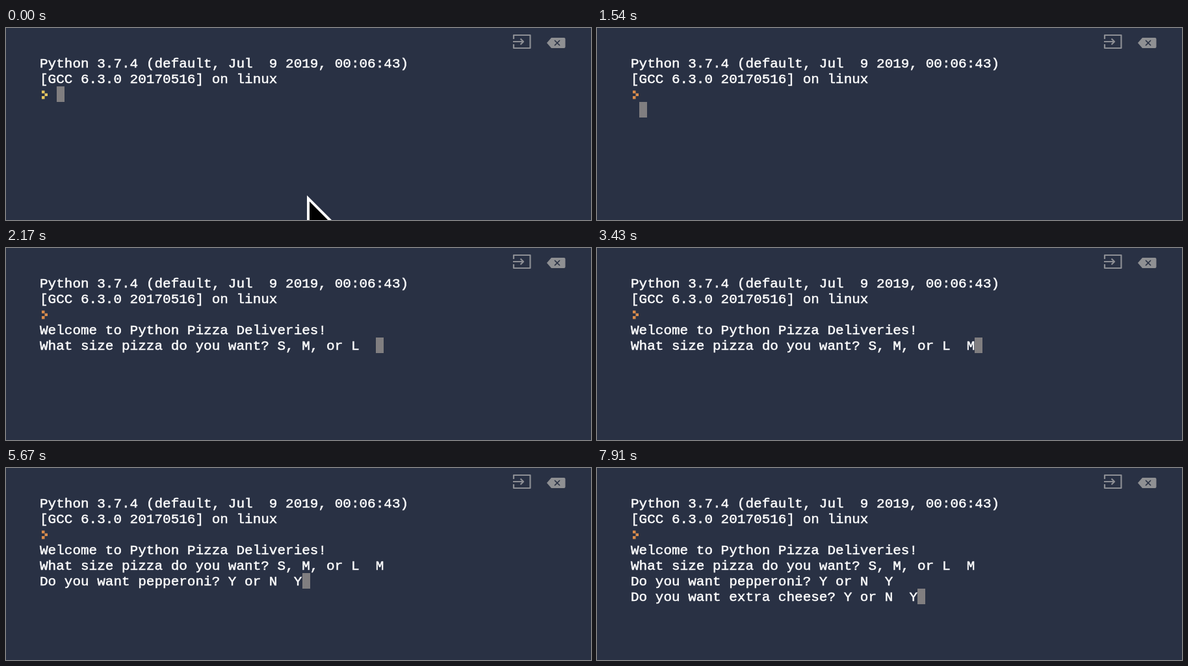
An HTML page for the animation above (8 s loop, 900 by 296 pixels).

```html
<!DOCTYPE html>
<html lang="en">
<head>
<meta charset="utf-8">
<title>Pizza terminal</title>
<style>
  html, body { margin: 0; width: 100%; height: 100%; overflow: hidden; background: #293144; }
  svg { display: block; width: 900px; height: 296px; }
  text {
    font: 21px "Liberation Mono", "Courier New", monospace;
    white-space: pre; fill: #fff; stroke: #fff; stroke-width: .5px;
  }
</style>
</head>
<body>
<svg viewBox="0 0 900 296">
  <rect width="900" height="296" fill="#293144"/>
  <g fill="none" stroke="#8c8e94" stroke-width="2.2" stroke-linejoin="round">
    <path d="M781 17V11H806.5V31H781V25"/>
    <path d="M780 21H796M791.5 16.5L796 21L791.5 25.5"/>
  </g>
  <path d="M832 23L839 15H858.5Q860.5 15 860.5 17V29Q860.5 31 858.5 31H839Z" fill="#8f9093"/>
  <path d="M844 19L852 27M852 19L844 27" stroke="#293144" stroke-width="1.7"/>
  <path id="prompt" d="M55 96.5h4.5v4.3h-4.5zM59.5 100.8h4.5v4.3h-4.5zM55 105.1h4.5v4.3h-4.5z"/>
  <g id="lines"></g>
  <rect id="caret" width="12" height="24" fill="#807e80"/>
  <g id="mouse">
    <path d="M0 0V81L18 64L29 90L42 85L31 60L57 57Z" fill="#fff"/>
    <path d="M4 9.5V72L19.5 57L31 84.5L36.5 82L25.5 55.5L47 53Z" fill="#000"/>
  </g>
</svg>
<script>
const LOOP = 8000, TICK = 70;
const LEFT = 52, CELL = 12.6, ROW = 24, TOP = 42;
const get = id => document.getElementById(id);
const clamp = v => Math.min(1, Math.max(0, v));

// Each row holds [time, text] entries; the latest one that has begun is shown.
const rows = [
  [[0, "Python 3.7.4 (default, Jul  9 2019, 00:06:43)"]],
  [[0, "[GCC 6.3.0 20170516] on linux"]],
  [],
  [[1610, "Welcome to Python Pizza Deliveries!"]],
  [[1610, "What size pizza do you want? S, M, or L  "],
   [3430, "What size pizza do you want? S, M, or L  M"]],
  [[4200, "Do you want pepperoni? Y or N  "],
   [5670, "Do you want pepperoni? Y or N  Y"]],
  [[6160, "Do you want extra cheese? Y or N  "],
   [7700, "Do you want extra cheese? Y or N  Y"]]
];

// [time, row, column]
const caretStops = [
  [0, 2, 2], [1470, 3, 1], [1610, 4, 41], [3430, 4, 42], [3990, 5, 1],
  [4200, 5, 31], [5670, 5, 32], [6020, 6, 1], [6160, 6, 34], [7700, 6, 35]
];

const latest = (steps, t) => steps.filter(step => step[0] <= t).pop();

const labels = rows.map((_, i) => {
  const label = document.createElementNS("http://www.w3.org/2000/svg", "text");
  label.setAttribute("x", LEFT);
  label.setAttribute("y", TOP + i * ROW + 19);
  return get("lines").appendChild(label);
});

function drawMouse(t) {
  const ease = 1 - (1 - clamp(t / 210)) ** 2;
  const x = 463 + 328 * ease, y = 258 - 243 * ease;
  get("mouse").setAttribute("transform", `translate(${x} ${y})`);
  get("mouse").setAttribute("opacity", 1 - clamp((t - 980) / 350));
}

function draw(time) {
  const t = Math.floor(time / TICK) * TICK;
  labels.forEach((label, i) => {
    const step = latest(rows[i], t);
    const value = step ? step[1] : "";
    if (label.textContent !== value) label.textContent = value;
  });
  const [, row, column] = latest(caretStops, t);
  get("caret").setAttribute("x", Math.round(LEFT + column * CELL + .3));
  get("caret").setAttribute("y", TOP + row * ROW);
  get("prompt").setAttribute("fill", t < 1050 ? "#e6c65f" : "#d98c4c");
  drawMouse(t);
}

const start = performance.now();
function frame() {
  draw((performance.now() - start) % LOOP);
  requestAnimationFrame(frame);
}
frame();
</script>
</body>
</html>
```
